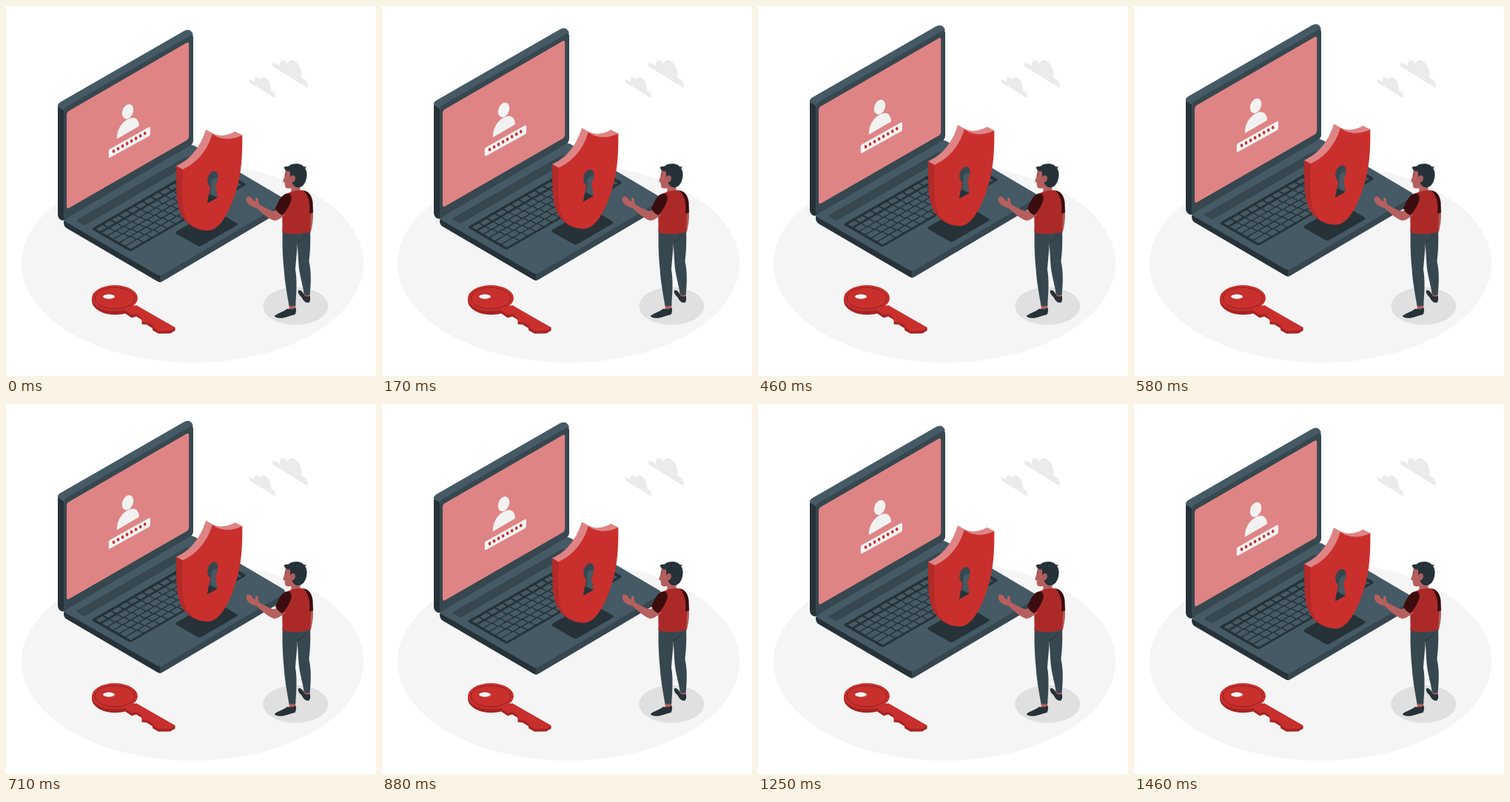
An HTML page that plays this animation: 500x500 px, repeating every 1500 ms.

```html
<!DOCTYPE html>
<html lang="en">
<head>
<meta charset="utf-8">
<title>Laptop security</title>
<style>
html, body { margin: 0; width: 100%; height: 100%; overflow: hidden; background: #fff; }
svg { display: block; width: 100vw; height: 100vh; }
.dark { fill: #263238; }
.slate { fill: #37474f; }
.steel { fill: #455a64; }
.red { fill: #c9302d; }
.brick { fill: #a62524; }
.skin { fill: #b5605f; }
.pale { fill: #f2f2f2; }
</style>
</head>
<body>
<svg viewBox="0 0 500 500" xmlns="http://www.w3.org/2000/svg">
  <ellipse cx="252" cy="348" rx="231" ry="134" fill="#f5f5f5"/>
  <ellipse cx="391.3" cy="405.5" rx="44" ry="25.5" fill="#e0e0e0"/>

  <g fill="#ebebeb">
    <path d="M408 109.3Q405.5 109.8 402 107.5L361 82C359.3 80.6 359.4 76.3 361.6 76.5C364.8 77 367.5 79.5 370 81.4C369.5 77 371 73.3 374.2 73.3C377 73.2 379.3 75.2 380.8 78C381.5 74.2 384.4 72.6 388 73.5C394.5 75.5 400 85 399.6 93.5L399 97.2C403.6 97.4 408.4 102.5 408 109.3Z"/>
    <path d="M364.3 123.8Q362.5 124.2 360 122.5L329.5 103.4C328 102.1 327.6 98.7 329.4 98.8C331.7 99 333.8 101 335.6 102.4C335.2 99 336.4 96.4 338.8 96.5C340.8 96.6 342.5 98 343.5 99.8C344.2 96.7 346.3 95.3 349 96.2C354 98 358.3 105.4 357.9 111.6L357.4 114.6C361 114.8 364.6 118.8 364.3 123.8Z"/>
  </g>

  <g id="float">
    <!-- base -->
    <path class="dark" d="M78 292Q78 288 82 287L209 361V372.8Q206.5 372.8 204 371.2L82 299.8Q78 297.4 78 292Z"/>
    <path class="slate" d="M208 361L374 260Q378 263 377.5 267Q377.5 273 374 275.5L212 371.3Q210 372.7 208 372.8Z"/>
    <path class="steel" d="M80.5 285L249 186.5Q254 187.6 258 190.2L375 259.2Q379 262.4 375 265.7L212 362.5Q208 364.8 204 362.5L81 291.5Q76.5 288.6 80.5 285Z"/>
    <path class="slate" d="M96 288.2L242 204Q245 202.5 248 204L256 208.6L109 294.3Q106 296 103 294.4L97 291Q94 289.4 96 288.2Z"/>
    <path class="dark" d="M118 299L269 211.8Q272 210 275 211.8L322.5 238.8Q325.3 240.5 322.5 242.2L171 329.8Q168 331.6 165 329.8L118 302.6Q114.5 300.8 118 299Z"/>
    <g id="keys" class="steel" transform="matrix(1 -.577 1 .577 116 301)"/>
    <path class="dark" d="M230.5 304L278.5 276.3Q281 275 283.5 276.3L311.5 292.7Q314 294.4 311.5 296.1L264 323.6Q261.3 325.2 258.7 323.6L230.5 307.4Q228 305.7 230.5 304Z"/>

    <!-- lid -->
    <path class="dark" d="M70 136L78 133L82 287L77 289.5Q70 288 70 281Z"/>
    <path class="steel" d="M70 135.5Q69 132 74 129L241 33Q249 29.3 252.5 37L252 46L78 140.5Z"/>
    <path class="slate" d="M78 142Q78 137.8 82 135.4L247.5 40.2Q253 37 253 43V181Q253 185.6 249 188L80 287.5Q78 288.6 78 286Z"/>
    <path fill="#df8484" d="M82 147Q82 143 85 141.2L244 49.3Q247.2 47.6 247.2 51V175.3Q247.2 179 244 181L85 272.5Q82 274 82 270.5Z"/>

    <!-- sign-in -->
    <g class="pale">
      <ellipse cx="164.5" cy="142.2" rx="7.2" ry="10.4" transform="rotate(22 164.5 142.2)"/>
      <path d="M149.8 179.3C149.3 166 157.5 154.4 168 151C175.5 148.8 180 154 179.8 161.8Z"/>
      <path d="M138.8 195.5Q138.8 193.7 140.5 192.7L193 163.2Q195 162.3 195 164.5V172Q195 174.2 193.3 175.2L140.8 204.2Q138.8 205.2 138.8 203.2Z"/>
    </g>
    <g id="dots" class="red"/>

    <!-- shield -->
    <path fill="#b32a28" d="M230 215.5L244 218L250 290L264 302.4C242 296 233 281 231 258C230 245 230 230 230 215.5Z"/>
    <path fill="#df8484" d="M230 215.5C246 209 262 193 270 166.5L279 171.5C288 176 298 175.5 309.5 169L319.3 174L300 190L284 200L250 226L238.6 220.3Z"/>
    <path class="red" d="M238.6 220.3C256 212.5 271.5 197 278.8 172.2C290 180.8 305 181 319.3 174C319.6 200 318.5 226 310.5 250C303 276 290 300 276 302.6C262 304.5 248 297 242.5 283C237.6 270 238.6 243 238.6 220.3Z"/>
    <path class="slate" d="M276.2 244C270.8 241 271.3 231.5 275 226.5C279.2 220.5 286 221.3 286.4 229C286.6 234 285 238.5 282.8 241.3L285.6 258.5L272 266Z"/>
    <path class="steel" d="M277.8 243C275.5 237 278.6 231.5 286.3 231C286.2 235 284.8 238.8 282.8 241.3L285.6 258.5L276.2 253Z"/>
    <path class="dark" d="M274 254.2L285.6 258.5L272 266Z"/>
  </g>

  <!-- key -->
  <path class="brick" d="M116 395V399C117 409 130 417 147 417.2C152 417.2 157 416.6 161 415.5L170 421.5L176 419.5L183.5 424V430L190 430.5L198 435.5V438L206 442.8L222 442.6L228.6 438.6V434.5L178 406Z"/>
  <path class="red" d="M176 404.3L228.6 434.7L222 438.8L206 439L198.5 434.3V431.5L191 427.5L184 427L183 420.5L176 416L170 417.5L160 411Z"/>
  <ellipse class="red" cx="147" cy="394.8" rx="31" ry="17.5"/>
  <ellipse cx="147" cy="394.8" rx="27" ry="14.4" fill="none" stroke="#8f1f1e" stroke-width="1"/>
  <ellipse class="brick" cx="139" cy="392" rx="8.4" ry="3.6"/>
  <ellipse cx="139" cy="392.6" rx="8" ry="3.1" fill="#fafafa"/>

  <!-- man -->
  <path class="skin" d="M410 278L415 277C415.3 288 414 299 411.5 306L408.5 303Z"/>
  <path class="skin" d="M402 387L410.5 386L410.5 394L404 394ZM382 402L391.5 402L391 411L383 411Z"/>
  <path class="dark" d="M395 384.5C397.5 382.5 401 386 403.5 391C406 393.5 409 392.5 410.7 391.5C411.6 396 411.3 399.5 409 401C404.5 401.5 401.5 397.5 399.5 393.5C396.5 391 394 387.5 395 384.5Z"/>
  <path class="dark" d="M363 418.5C368 415 375 413 380.5 409C384 410 388 409.8 391.5 407.5C392.5 411 392 414.5 390.5 417C385 418 380 420.5 374.5 421.6C369 422.2 363 421.5 363 418.5Z"/>
  <path class="slate" d="M392 306L411 303C411.8 317 411 332 409.5 345C412.5 358 412.3 374 410.6 390Q406.5 392 403 389.5C400 373 396 361 395.3 347L393.5 318Z"/>
  <path class="slate" d="M373.8 304L408 304C404 314 398 318 394 319C393.2 333 391.7 345 391 356C393.5 369 392.5 388 391.2 404.5Q386.5 407 382.4 404.5C379.5 388 376.5 372 375.6 356C374 340 373 320 373.8 304Z"/>
  <path d="M393 319.5Q402 317 405 309" fill="none" stroke="#263238" stroke-width="1"/>
  <path class="skin" d="M386 243L397 241L398 254Q391 257 385 252Z"/>
  <path fill="#ab2a28" d="M381 253C386 250 393 249.3 399 249C405 249.4 411 253 413 260C414 276 411 290 411.3 305C400 309 384 309 373.3 306C374 291 372.5 276 373 263Z"/>
  <path fill="#3b0d0e" d="M402 249.3C410 250.5 414 258 414.6 266L415 279L410 280.5C411 270 410.8 259 402 249.3Z"/>
  <path class="skin" d="M370 275L377 282C372 286 367 290.5 362 290C354 287 345 279 338.5 273C332 271.5 327 268.5 325 263.5C324 260 325 257.3 328 257.2C331 257 332.2 260 334.5 263C337 265 337.6 263.5 337.2 260.5C337.5 258.5 339.8 258.6 340.6 261C341 264 341 267 342.5 268.7C348 271 355 275.5 361 277.3Z"/>
  <path fill="#3b0d0e" d="M364 273.5C368 265 371 255.5 379.5 253.3C385.5 252.5 387 258.5 385 264C382.5 271 378.5 277.5 373.5 283Q367 280 364 273.5Z"/>
  <path class="skin" d="M378 221C376.6 227 376.8 231 374.2 236.5Q374 238 376.5 238.3L377 243Q377.5 246.5 381.5 246.5L388 246L397 240L396 222Z"/>
  <path class="dark" d="M375.7 217.5C378 216.8 380 216.6 382 216.4C385 213.8 390 212.8 395 213.2C398.3 213.6 401 215.3 403 217.6L405.8 216.6L404.3 219.5C407.5 224 407 231 404.8 237C402.5 242.5 399 245.5 393.5 245.2C389.5 244.5 387 241 385.5 236L384 230L383.8 223.5C379.5 224 376 221.5 375.7 217.5Z"/>
  <ellipse class="skin" cx="387.3" cy="233.5" rx="3.4" ry="4.6" transform="rotate(15 387.3 233.5)"/>
  <path d="M386.4 235.5Q386.5 232 389 232" fill="none" stroke="#8a4342" stroke-width=".7"/>
  <path d="M377 228L379 227.3" stroke="#263238" stroke-width="1"/>
</svg>
<script>
const LOOP = 1500, RISE = 10, REST = 0.8, LEAD = 21;
const $ = id => document.getElementById(id);

function add(parent, tag, attrs) {
  const el = document.createElementNS("http://www.w3.org/2000/svg", tag);
  for (const name in attrs) el.setAttribute(name, attrs[name]);
  parent.appendChild(el);
}

const key = (x, y, width, height = 6.6) => add($("keys"), "rect", { x, y, width, height, rx: 1 });

// function row, then five staggered rows whose end keys absorb the shift
for (let i = 0; i < 14; i++) key(3 + i * 10.8, 2.6, 8.8, 5.6);

for (let row = 0; row < 5; row++) {
  const y = 11 + row * 8, shift = row * 1.6;
  for (let i = 0; i < 14; i++) {
    const x = 3 + i * 10.8 + (i ? shift : 0);
    key(x, y, 9.4 + (i === 0 ? shift : i === 13 ? -shift : 0));
  }
}

for (let i = 0; i < 8; i++) {
  add($("dots"), "ellipse", { cx: 145.5 + i * 6.03, cy: 195.8 - i * 3.48, rx: 1.8, ry: 2.3 });
}

function draw(ms) {
  const p = ((ms + LEAD) % LOOP) / LOOP;
  const lift = RISE * (1 - Math.abs(1 - 2 * p));
  $("float").setAttribute("transform", `translate(0 ${REST - lift})`);
}

function tick() {
  draw(performance.now());
  requestAnimationFrame(tick);
}
tick();
</script>
</body>
</html>
```
